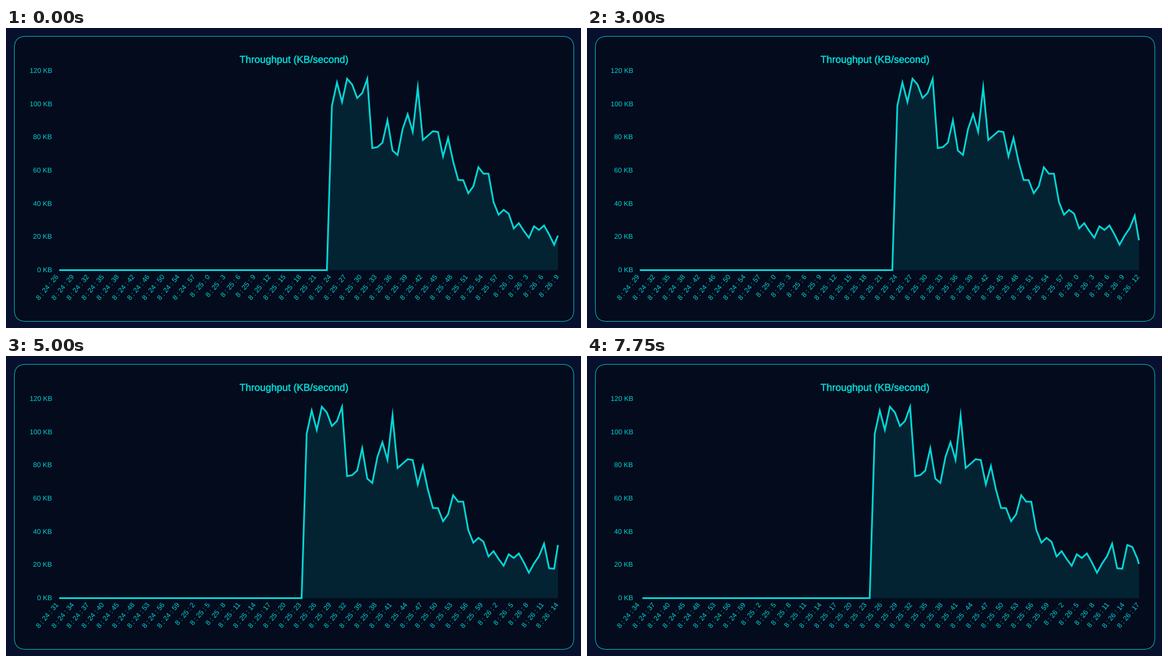
A matplotlib script for the animation above (8000 ms loop, 997 px wide and 521 px high).

```python
import numpy as np
import matplotlib.pyplot as plt
from matplotlib import patheffects
from matplotlib.animation import FuncAnimation
from matplotlib.patches import FancyBboxPatch, Polygon

W, H, DPI = 997, 521, 100
PT = 72 / DPI                      # points per pixel
STEP_MS, STEPS = 250, 32

OUTER, CARD = "#07112d", "#030b1c"
CYAN, TEXT, AREA = "#02d7d7", "#02d2d2", "#042332"

LEFT, RIGHT, BASE, KB = 90, 957, 420.5, 2.883
POINTS = 100
GAP = (RIGHT - LEFT) / (POINTS - 1)
TILT = np.radians(50)

# Readings from 8:25:24 on; everything earlier is zero.
READINGS = [
    99, 113, 101.3, 115.3, 111.8, 103.7, 106.7, 115.2, 73.5, 74.1,
    76.8, 90.3, 72, 69.4, 85, 93.9, 83.3, 110, 78.4, 81,
    83.7, 83.2, 68.5, 79.6, 65.4, 54.3, 54.2, 46.3, 50.5, 62,
    58.1, 58.1, 41, 33.4, 36.3, 34, 25.1, 28.3, 23.6, 19.5,
    26.4, 24.2, 26.9, 21.5, 15.3, 20.8, 25.3, 32.8, 18, 17.7,
    32, 30.8, 23.8, 20.6,
]
FIRST_LAST = 45                    # newest reading when the loop begins
# Arrival time (ms) of each new reading.
ARRIVALS = [-290, 890, 1700, 2640, 3650, 4708, 5708, 6690, 7662]


def reading(i):
    return READINGS[i] if i >= 0 else 0


def clock(i):
    """Time label of reading i; a few early readings came in late."""
    lag = sum(i <= k for k in (-32, -34, -39, -42)) + (i == -40)
    sec = 84 + i - lag
    return f"8 : {24 + sec // 60} : {sec % 60}"


def state(ms):
    """Newest reading and the remaining slide in pixels (ease-out quart)."""
    k = max(n for n, t in enumerate(ARRIVALS) if t <= ms)
    u = min((ms - ARRIVALS[k]) / 1000, 1)
    return FIRST_LAST + k, GAP * (1 - u) ** 4


def curve(last, slide):
    idx = np.arange(last - POINTS + 1, last + 1)
    x = RIGHT - (last - idx) * GAP + slide
    x[-1] = RIGHT                  # the newest point appears in place
    y = BASE - KB * np.array([reading(i) for i in idx])
    return np.column_stack([x, y])


def stroke(pts, half=1.5, limit=10):
    """Outline of a polyline with mitred joins, bevelled past the limit."""
    d = np.diff(pts, axis=0)
    d /= np.hypot(d[:, 0], d[:, 1])[:, None]
    n = np.column_stack([-d[:, 1], d[:, 0]]) * half
    sides = {1: [pts[0] + n[0]], -1: [pts[0] - n[0]]}
    for p, a, b, da, db in zip(pts[1:-1], n, n[1:], d, d[1:]):
        m = (a + b) / (1 + da @ db)
        outer = -1 if da[0] * db[1] - da[1] * db[0] > 0 else 1
        for s in (1, -1):
            if s == outer and np.hypot(*m) > limit * half:
                sides[s] += [p + s * a, p + s * b]
            else:
                sides[s].append(p + s * m)
    sides[1].append(pts[-1] + n[-1])
    sides[-1].append(pts[-1] - n[-1])
    return np.array(sides[1] + sides[-1][::-1])


plt.rcParams["font.family"] = "Liberation Sans"
plt.rcParams["text.hinting"] = "none"

fig = plt.figure(figsize=(W / DPI, H / DPI), dpi=DPI, facecolor=OUTER)
ax = fig.add_axes([0, 0, 1, 1])
ax.set(xlim=(0, W), ylim=(H, 0))
ax.axis("off")

ax.add_patch(FancyBboxPatch(
    (14.5, 14.5), 970, 495, boxstyle="round,pad=0,rounding_size=20",
    fc=CARD, ec="#02c3c5", lw=1 * PT))


def label(x, y, s, size=12, **kw):
    return ax.text(x, y, s, size=size * PT, color=TEXT, va="baseline", **kw)


title = label(499.5, 60.5, "Throughput (KB/second)", 17.35, ha="center")
title.set_path_effects(
    [patheffects.withStroke(linewidth=0.45 * PT, foreground=TEXT)])

for v in range(0, 121, 20):
    label(80, BASE - KB * v + 3.4, f"{v} KB", ha="right")

area = ax.add_patch(Polygon([(0, 0)] * 3, fc=AREA, lw=0))
line = ax.add_patch(Polygon([(0, 0)] * 3, fc=CYAN, lw=0))
ticks = [
    label(RIGHT - k * GAP + 3.24 * np.sin(TILT), 430 + 3.24 * np.cos(TILT), "",
          ha="right", rotation=50, rotation_mode="anchor")
    for k in range(0, POINTS, 3)
]


def draw(step):
    last, slide = state(step * STEP_MS)
    pts = curve(last, slide)
    area.set_xy(np.vstack([pts, (RIGHT, BASE), (pts[0, 0], BASE)]))
    line.set_xy(stroke(pts))
    for k, tick in enumerate(ticks):
        tick.set_text(clock(last - 3 * k))
    return [area, line, *ticks]


anim = FuncAnimation(fig, draw, frames=STEPS, interval=STEP_MS,
                     repeat=True, repeat_delay=0, blit=False)
plt.show()
```
